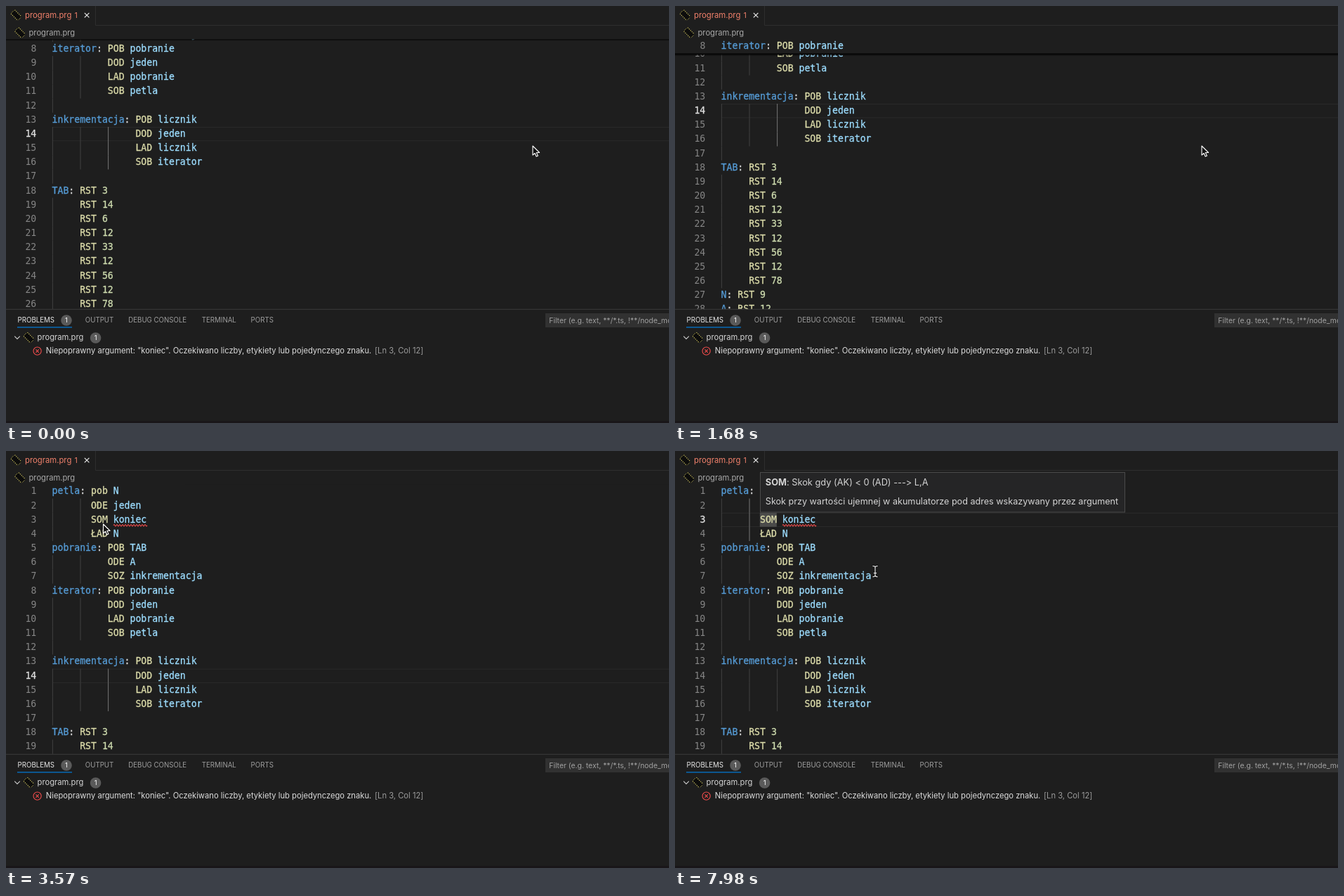
These frames come from a looping animation (944 by 593 pixels, 8 s). An HTML page:

```html
<!DOCTYPE html>
<html lang="pl">
<head>
<meta charset="utf-8">
<title>program.prg</title>
<style>
  html, body { margin: 0; width: 100%; height: 100%; overflow: hidden; background: #1e1e1e; }
  svg { display: block; width: 944px; height: 593px; font: 11.2px Inter, "Noto Sans", sans-serif; font-variant-ligatures: none; }
  .code { font: 13.16px "DejaVu Sans Mono", "Liberation Mono", monospace; }
  .code tspan { stroke-width: .3px; }
  .label { fill: #569cd6; stroke: #569cd6; }
  .colon { fill: #d4d4d4; stroke: #d4d4d4; }
  .op { fill: #dcdcaa; stroke: #dcdcaa; }
  .arg { fill: #9cdcfe; stroke: #9cdcfe; }
  .num { fill: #cddbae; stroke: #cddbae; }
  .lineno { fill: #858585; text-anchor: end; }
  .lineno.active { fill: #e0e0e0; stroke: #e0e0e0; stroke-width: .3px; }
  .guide { stroke: #404040; }
  .guide.active { stroke: #777; }
  .tab { font-size: 9.68px; fill: #9d9d9d; }
  .badge { font-size: 9.5px; fill: #fff; text-anchor: middle; }
  .hover { font-size: 12.6px; fill: #d4d4d4; }
  .strong { font-weight: 700; }
</style>
</head>
<body>
<svg viewBox="0 0 944 593" xmlns="http://www.w3.org/2000/svg">
  <defs>
    <g id="chip" transform="rotate(45)">
      <rect x="-7" y="-3.5" width="14" height="7" fill="#0c0c0c"/>
      <path d="M-6.6-3.8H7M-6.6 3.8H7" stroke="#cfc35a" stroke-width="1.3" stroke-dasharray="1.1 1.6"/>
      <path d="M-7-2.2V2.6M7-2.2V2.6" stroke="#8d8544" stroke-width=".8"/>
    </g>
  </defs>
  <rect width="944" height="593" fill="#1e1e1e"/>

  <g id="editor" class="code">
    <g id="currentLine">
      <path d="M66 .5H944M66 19.8H944" stroke="#2a2a2a"/>
    </g>
    <rect id="wordMark" x="120.8" y="87.8" width="24" height="20" fill="#4b4b4a"/>
    <g id="lines"></g>
  </g>
  <rect id="caret" x="136.2" y="88" width="1.6" height="19.6" fill="#c4c4c2"/>

  <g id="sticky">
    <rect y="47" width="944" height="21" fill="#1e1e1e"/>
    <g id="stickyLine" class="code"></g>
    <rect y="67.4" width="944" height="2" fill="#060606"/>
    <rect y="69.4" width="944" height="1.4" fill="#000" opacity=".3"/>
  </g>

  <g id="header">
    <rect width="944" height="47.4" fill="#1e1e1e"/>
    <rect id="headerShadow" y="47" width="944" height="2" fill="#000" opacity=".5"/>
    <path d="M127.5 0V27.5H944" fill="none" stroke="#2e2e2e"/>
    <use href="#chip" transform="translate(14.5 13)"/>
    <text x="27" y="17" fill="#f0806b" font-size="11.3">program.prg</text>
    <text x="97.5" y="17" fill="#f0806b" font-size="10.6">1</text>
    <path d="M111.8 9.8l6.6 6.6m0-6.6l-6.6 6.6" stroke="#e8e8e8" stroke-width="1.2"/>
    <use href="#chip" transform="translate(20 38)"/>
    <text x="32.5" y="42" fill="#a9a9a9">program.prg</text>
  </g>

  <g id="panel">
    <rect y="431" width="944" height="162" fill="#1e1e1e"/>
    <path d="M0 431.3H944" stroke="#3b3b3b"/>
    <rect y="590" width="944" height="3" fill="#191619"/>
    <g class="tab">
      <text x="16.6" y="450.2" fill="#e7e7e7">PROBLEMS</text>
      <text x="112.8" y="450.2">OUTPUT</text>
      <text x="174.3" y="450.2">DEBUG CONSOLE</text>
      <text x="278.8" y="450.2">TERMINAL</text>
      <text x="348.6" y="450.2">PORTS</text>
    </g>
    <path d="M16 456.8H94" stroke="#0078d4" stroke-width="1.2"/>
    <circle cx="86" cy="447" r="7.8" fill="#5a5a5a"/>
    <text class="badge" x="86" y="450.4">1</text>
    <rect x="768" y="437" width="176" height="20" fill="#313131"/>
    <text x="773.3" y="451" font-size="10.4" fill="#a0a0a0">Filter (e.g. text, **/*.ts, !**/node_modules)</text>
    <path d="M12.2 469.6l3.8 3.8 3.8-3.8" fill="none" stroke="#ccc" stroke-width="1.1"/>
    <use href="#chip" transform="translate(32.5 471.5)"/>
    <text x="44.6" y="475.2" fill="#d4d4d4">program.prg</text>
    <circle cx="127.6" cy="472" r="7.8" fill="#5a5a5a"/>
    <text class="badge" x="127.6" y="475.4">1</text>
    <g fill="none" stroke="#f14c4c" stroke-width="1.1">
      <circle cx="44.6" cy="490.6" r="5.6"/>
      <path d="M42.4 488.4l4.4 4.4m0-4.4l-4.4 4.4"/>
    </g>
    <text x="56.8" y="494.4" fill="#dcdcdc">Niepoprawny argument: "koniec". Oczekiwano liczby, etykiety lub pojedynczego znaku.</text>
    <text x="525" y="494.4" fill="#9a9a9a">[Ln 3, Col 12]</text>
  </g>

  <g id="hover" class="hover">
    <rect x="121.5" y="30.5" width="519" height="56.5" fill="#252526" stroke="#4a4a4a"/>
    <text x="128.8" y="49.2" font-size="12.8"><tspan class="strong">SOM</tspan>: Skok gdy (AK) &lt; 0 (AD) ---&gt; L,A</text>
    <text x="128.8" y="76.2">Skok przy wartości ujemnej w akumulatorze pod adres wskazywany przez argument</text>
  </g>

  <path id="arrow" d="M0 0V13L3 10.3 5.1 15 7.4 14 5.3 9.5H9.6Z" fill="#111" stroke="#fff" stroke-width="1.1" stroke-linejoin="round"/>
  <g id="beam" fill="none" stroke-linecap="round">
    <path d="M-3.2-7.6Q0-7.6 0-5.6Q0-7.6 3.2-7.6M0-5.6V5.6M-3.2 7.6Q0 7.6 0 5.6Q0 7.6 3.2 7.6M-1.8 2.4H1.8" stroke="#111" stroke-width="3"/>
    <path d="M-3.2-7.6Q0-7.6 0-5.6Q0-7.6 3.2-7.6M0-5.6V5.6M-3.2 7.6Q0 7.6 0 5.6Q0 7.6 3.2 7.6M-1.8 2.4H1.8" stroke="#e6e6e6" stroke-width="1.2"/>
  </g>
</svg>
<script>
const LOOP = 8000, TICK = 70;
const TOP = 47.4, PITCH = 20.17, BASELINE = 14, LEFT = 65.6, CHAR = 7.922;
const CLICK = 3850;

const program = `petla: pob N
ODE jeden
SOM koniec
ŁAD N
pobranie: POB TAB
ODE A
SOZ inkrementacja
iterator: POB pobranie
DOD jeden
LAD pobranie
SOB petla

inkrementacja: POB licznik
DOD jeden
LAD licznik
SOB iterator

TAB: RST 3
RST 14
RST 6
RST 12
RST 33
RST 12
RST 56
RST 12
RST 78
N: RST 9
A: RST 12
licznik: RST 0
jeden: RST 1`.split('\n');

// Header line and last line of each block that can stick to the top.
const scopes = [[1, 3], [5, 6], [8, 11], [13, 16]];

const $ = id => document.getElementById(id);
const show = (el, on) => el.setAttribute('visibility', on ? 'visible' : 'hidden');
const move = (el, x, y) => el.setAttribute('transform', `translate(${x} ${y})`);
const clamp = u => Math.min(1, Math.max(0, u));
const smooth = u => u * u * (3 - 2 * u);
const lineTop = n => TOP + (n - 1) * PITCH;

const rows = [];
let indent = 0;
program.forEach((text, i) => {
  const [, label, op, arg] = text.match(/^(?:(\S+): )?(\S*) ?(\S*)$/);
  if (label) indent = label.length + 2;
  rows.push({ n: i + 1, label, op, arg, indent });
});

function lineMarkup({ n, label, op, arg, indent }) {
  const token = (cls, col, text) =>
    `<tspan class="${cls}" x="${LEFT + col * CHAR}">${text}</tspan>`;
  let out = `<text class="lineno" x="43.3" y="${BASELINE}">${n}</text><text y="${BASELINE}">`;
  if (label) out += token('label', 0, label) + token('colon', label.length, ':');
  if (op) out += token('op', indent, op) + token(/\d/.test(arg) ? 'num' : 'arg', indent + op.length + 1, arg);
  return out + '</text>';
}

function guideMarkup({ n, label, op, indent }) {
  if (label) return '';
  const width = op ? indent : 1;
  let out = '';
  for (let col = 0; col < width; col += 5) {
    const innermost = op && col + 5 >= width;
    const block = innermost && n < 5 ? 'first' : innermost && n > 13 && n < 17 ? 'second' : '';
    out += `<path class="guide" data-block="${block}" d="M${66.4 + col * CHAR} 0V${PITCH}"/>`;
  }
  return out;
}

function squiggle(x, y, width) {
  let d = `M${x} ${y}`;
  for (let i = 0; i < width / 4; i++) d += 'q1-2.4 2 0t2 0';
  return `<path d="${d}" fill="none" stroke="#f14c4c" stroke-width="1.1"/>`;
}

$('lines').innerHTML = rows.map(row =>
  `<g transform="translate(0 ${lineTop(row.n)})">${guideMarkup(row)}${lineMarkup(row)}` +
  (row.arg === 'koniec' ? squiggle(153, 18, 48) : '') + '</g>').join('');
const numbers = [...document.querySelectorAll('#lines .lineno')];
const guides = [...document.querySelectorAll('.guide')];

function scrollAt(t) {
  const start = 137.7, end = 299;
  const progress = from => clamp((t - from + TICK) / 700);
  if (t < 1400) {
    const u = progress(210) ** 1.3;
    return start + (end - start) * (1 - (1 - u) ** 2.69);
  }
  return end * (1 - smooth(progress(1400) ** 1.143));
}

// Pointer stops: time, x, y.
const stops = [
  [0, 750, 199], [2450, 750, 199], [2590, 520, 220], [2730, 246, 190],
  [2940, 246, 190], [3360, 119, 86], [3570, 138.5, 104], [3780, 137, 98],
  [4060, 137, 98], [4410, 183, 121], [4900, 139, 108], [5040, 139, 103.2],
  [7700, 139, 103.2], [7980, 285, 171.2]
];

function pointerAt(t) {
  const i = stops.findIndex(s => s[0] > t);
  if (i < 0) return stops[stops.length - 1].slice(1);
  const [t0, x0, y0] = stops[i - 1], [t1, x1, y1] = stops[i];
  const u = smooth((t - t0) / (t1 - t0));
  return [x0 + (x1 - x0) * u, y0 + (y1 - y0) * u];
}

let stuckLine = 0;
function updateSticky(scroll) {
  const scope = scopes.find(([first, last]) =>
    lineTop(first) - scroll < TOP - 0.1 && lineTop(last + 1) - scroll > TOP);
  show($('sticky'), scope);
  show($('headerShadow'), scroll > 0 && !scope);
  if (!scope) return;
  const [first, last] = scope;
  move($('sticky'), 0, Math.min(0, lineTop(last) - scroll - TOP));
  if (first !== stuckLine) {
    stuckLine = first;
    $('stickyLine').innerHTML = `<g transform="translate(0 ${TOP})">${lineMarkup(rows[first - 1])}</g>`;
  }
}

function render(time) {
  const t = Math.floor(time % LOOP / TICK) * TICK;
  const scroll = scrollAt(t), clicked = t >= CLICK;
  const current = clicked ? 3 : 14;

  move($('editor'), 0, -scroll);
  move($('currentLine'), 0, lineTop(current));
  numbers.forEach((el, i) => el.classList.toggle('active', i + 1 === current));
  guides.forEach(el => el.classList.toggle('active', el.dataset.block === (clicked ? 'first' : 'second')));
  updateSticky(scroll);

  const blink = Math.max(0, Math.floor((t - 3869) / 514));
  show($('caret'), clicked && blink % 2 === 0);
  show($('wordMark'), t >= 4130);
  $('hover').setAttribute('opacity', clamp((t - 5390 + TICK) / 210));

  const [x, y] = pointerAt(t);
  move($('arrow'), x, y);
  move($('beam'), x, y);
  show($('arrow'), !clicked);
  show($('beam'), clicked);
}

function frame() {
  render(performance.now());
  requestAnimationFrame(frame);
}
frame();
</script>
</body>
</html>
```
